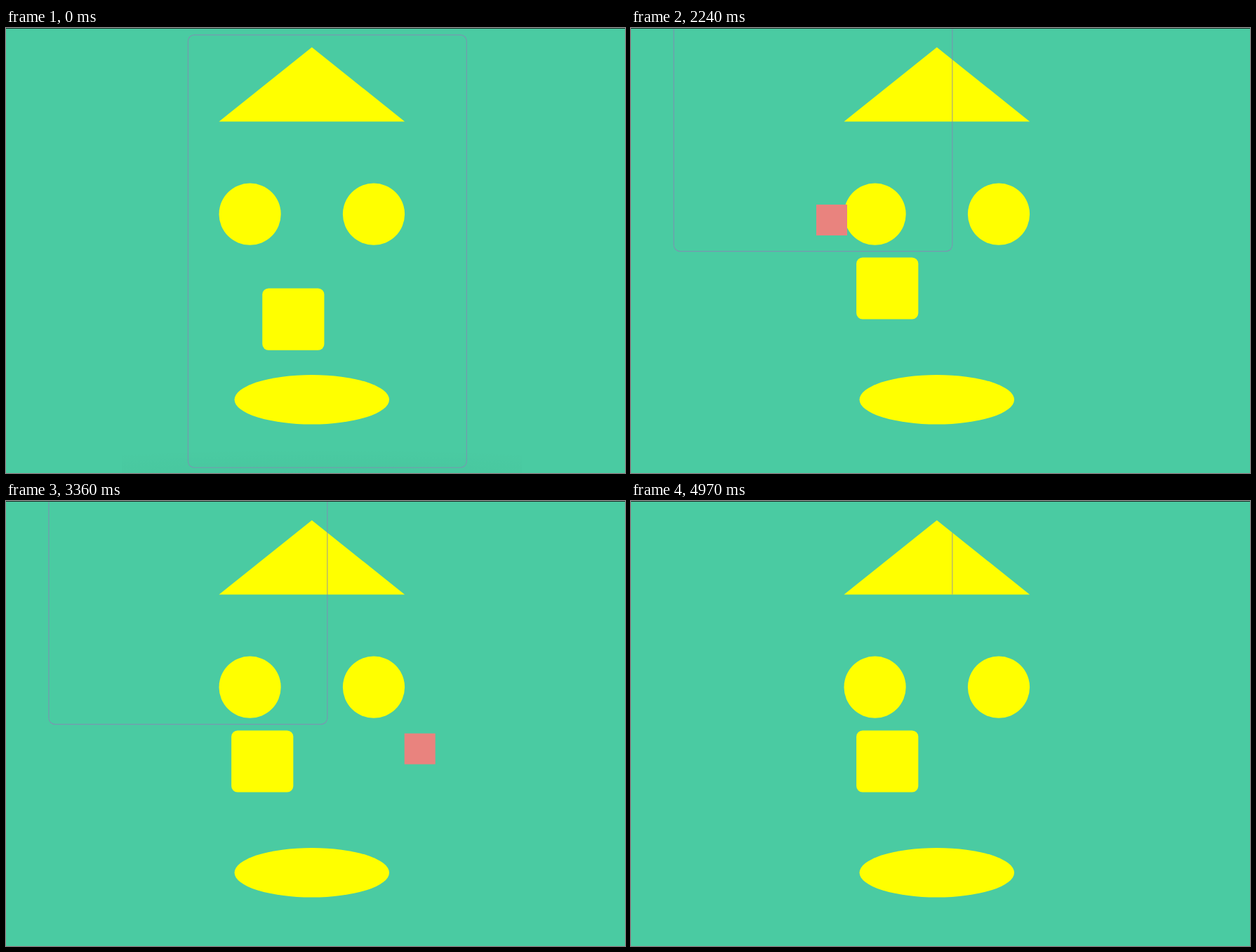
Animation of 882 by 635 pixels, one loop 5.11 s. Source, as an HTML page:

```html
<!DOCTYPE html>
<html lang="en">
<head>
<meta charset="utf-8">
<title>Face and cursor</title>
<style>
  html, body { margin: 0; width: 100%; height: 100%; overflow: hidden; background: #4acba2; }
  svg { display: block; }
</style>
</head>
<body>
<svg width="882" height="635" viewBox="0 0 882 635">
  <defs>
    <clipPath id="hat"><path d="M50 140L200 20L350 140Z"/></clipPath>
    <radialGradient id="shade" cy="1" r=".9">
      <stop stop-color="#000" stop-opacity=".025"/>
      <stop offset="1" stop-color="#000" stop-opacity="0"/>
    </radialGradient>
  </defs>
  <rect id="dock" x="165" y="595" width="570" height="40" fill="url(#shade)"/>
  <g transform="translate(259.4 9.9) scale(.882)">
    <g fill="#ff0">
      <path d="M50 140L200 20L350 140Z"/>
      <circle cx="100" cy="290" r="50"/>
      <circle cx="300" cy="290" r="50"/>
      <rect id="nose" x="120" y="410" width="100" height="100" rx="10"/>
      <ellipse cx="200" cy="590" rx="125" ry="40"/>
    </g>
    <g id="frameClip">
      <rect id="frame" width="450" height="700" rx="10" fill="none"
            stroke="#8787b4" stroke-opacity=".75" stroke-width="1.3"/>
    </g>
  </g>
  <rect id="cursor" width="44" height="44" fill="#e9837e"/>
  <rect width="882" height="1" fill="#1c2b26"/>
</svg>
<script>
const LOOP = 5110, STEP = 70, JUMP = 1190;

// Cursor centre: time, x, y
const path = [
  [1750, -30, 240], [2240, 286, 274], [2520, 500, 304], [2800, 679, 310],
  [3080, 573, 259], [3710, 613, 495], [3990, 490, 540], [4410, -30, 560]
];
const $ = id => document.getElementById(id);
const show = (el, on) => el.setAttribute('visibility', on ? 'visible' : 'hidden');

function slope(i, axis) {
  const a = path[Math.max(i - 1, 0)], b = path[Math.min(i + 1, path.length - 1)];
  return (b[axis] - a[axis]) / (b[0] - a[0]);
}

// Smooth Hermite curve through the path points
function along(t, axis) {
  const i = path.findIndex((p, k) => k + 1 < path.length && t <= path[k + 1][0]);
  const a = path[i], b = path[i + 1], span = b[0] - a[0], u = (t - a[0]) / span;
  const ease = u * u * (3 - 2 * u);
  return a[axis] + (b[axis] - a[axis]) * ease
    + span * u * (1 - u) * (slope(i, axis) * (1 - u) - slope(i + 1, axis) * u);
}

function draw(now) {
  const t = Math.floor((now % LOOP) / STEP) * STEP;
  const centred = t >= JUMP;
  const active = t >= path[0][0] && t <= path[path.length - 1][0];

  $('nose').setAttribute('transform', centred ? 'translate(-50 -50)' : '');
  $('frame').setAttribute('transform', centred ? 'translate(-225 -350)' : '');
  // Without the cursor, the moved outline shows only across the hat
  $('frameClip').setAttribute('clip-path', centred && !active ? 'url(#hat)' : 'none');
  show($('dock'), !centred);
  show($('cursor'), active);
  if (active) {
    $('cursor').setAttribute('x', along(t, 1) - 22);
    $('cursor').setAttribute('y', along(t, 2) - 22);
  }
}

function tick() {
  draw(performance.now());
  requestAnimationFrame(tick);
}
tick();
</script>
</body>
</html>
```
